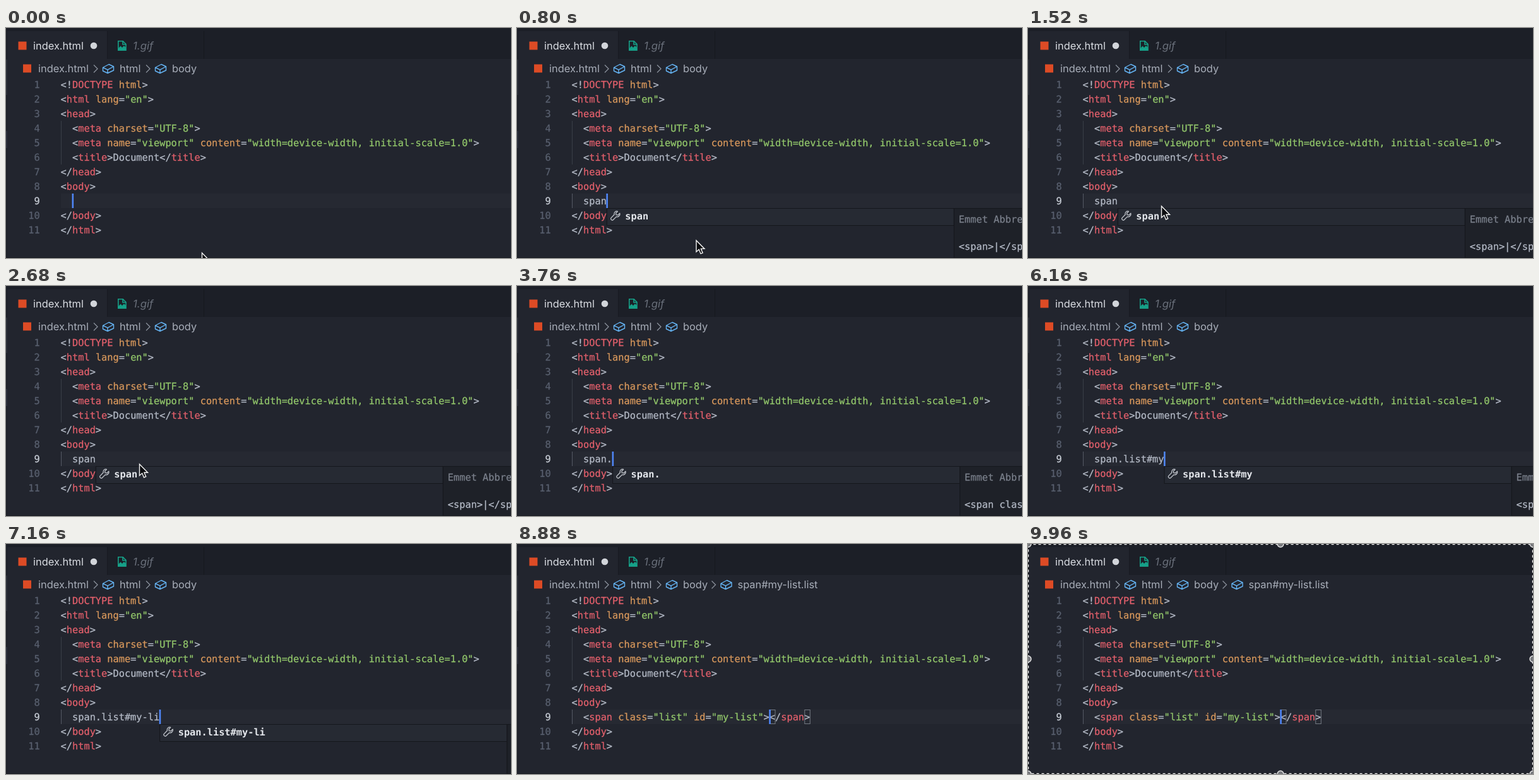
An HTML page that plays this animation: 800 px wide and 364 px high, repeating every 10000 ms.

```html
<!DOCTYPE html>
<html lang="en">
<head>
<meta charset="utf-8">
<title>Editor abbreviation</title>
<style>
html, body { margin: 0; width: 100%; height: 100%; overflow: hidden; background: #22252e; }
svg { display: block; width: 100vw; height: 100vh; }
text { white-space: pre; text-rendering: geometricPrecision; fill: currentColor; }
.code { font: 15.3px "DejaVu Sans Mono", monospace; color: #b4bac6; }
.code, .code tspan { fill: currentColor; stroke: currentColor; stroke-width: .25px; }
.bold { font-weight: bold; color: #e4e7ec; stroke: none; }
.ui { font: 16.4px Inter, sans-serif; color: #a8aeb9; }
.num { color: #59606f; text-anchor: end; }
</style>
</head>
<body>
<svg id="stage" viewBox="0 0 800 364"></svg>
<script>
const LOOP = 10000, X0 = 86.6, CW = 9.211, TOP = 262;
const RED = '#e4606c', ORANGE = '#d8985c', GREEN = '#93c86b', GREY = '#b4bac6';
const LINES = [
  '<!DOCTYPE html>', '<html lang="en">', '<head>', '  <meta charset="UTF-8">',
  '  <meta name="viewport" content="width=device-width, initial-scale=1.0">',
  '  <title>Document</title>', '</head>', '<body>', '', '</body>', '</html>'
];
const TYPED = 'span.list#my-list';
const KEYS = [240, 400, 560, 700, 3440, 4240, 4360, 4520, 4640, 4800,
  5440, 5680, 6320, 6720, 7040, 7240, 7440];
const EXPAND = 7840, CRUMB = 8000, FRAME = 9920;
const RESULT = '<span class="list" id="my-list"></span>';

const esc = s => s.replace(/&/g, '&amp;').replace(/</g, '&lt;');
const rect = (x, y, w, h, fill, more = '') =>
  `<rect x="${x}" y="${y}" width="${w}" height="${h}" fill="${fill}" ${more}/>`;
const text = (x, y, s, cls, style = '') => `<text x="${x}" y="${y}" class="${cls}" style="${style}">${s}</text>`;
const colX = n => X0 + n * CW;
const rowY = n => TOP + (n - 9) * 23;

function highlight(src) {
  let inTag = false, prev = '';
  return src.match(/<[!\/]?|"[^"]*"|[\w-]+|[^<"\w]+/g).map(tok => {
    let color = GREY;
    if (tok[0] === '<') inTag = true;
    else if (tok[0] === '"') color = GREEN;
    else if (/^[\w-]/.test(tok)) color = prev[0] === '<' ? RED : inTag ? ORANGE : GREY;
    else if (tok.includes('>')) inTag = false;
    prev = tok;
    return `<tspan style="color:${color}">${esc(tok)}</tspan>`;
  }).join('');
}

function codeLine(src, n) {
  const body = src.trimStart();
  return text(colX(src.length - body.length), rowY(n) + 16.5, highlight(body), 'code');
}

const chevron = x => `<path d="M${x - 3} 58.5l6 6l-6 6" fill="none" stroke="#8a909b" stroke-width="1.3"/>`;
const cube = x => `<path transform="translate(${x} 64)" d="M-8.5 -1.5L1 -6.5L8.5 -3V3L-1 7.5L-8.5 4ZM-8.5 -1.5L-1 2.2L8.5 -3M-1 2.2V7.5"
  fill="none" stroke="#65b4f4" stroke-width="1.4" stroke-linejoin="round"/>`;
const crumb = (x, label) => chevron(x) + cube(x + 20) + text(x + 38, 70, label, 'ui');

function backdrop() {
  let s = rect(0, 0, 800, 364, '#22252e') + rect(0, 0, 800, 49, '#1c1f27') +
    rect(2, 5, 158, 45, '#22252e') + rect(160, 5, 1, 44, '#181a21') + rect(313, 5, 1, 44, '#16181e') +
    rect(0, 49, 2, 315, '#1d2028') + rect(0, 50, 2, 56, '#2a2e37') + rect(0, 163, 2, 27, '#2a2e3a');
  s += rect(19.5, 21.5, 13, 13, '#dd4b25') + text(43, 33.5, 'index.html', 'ui', 'color:#dadde3') +
    '<circle cx="139" cy="28" r="5.3" fill="#d2d5da"/>';
  s += `<path d="M177.8 20.8h7.4l4.8 4.8v9.6h-12.2zM185 21v5h5" fill="none" stroke="#16a088" stroke-width="1.6"/>
    <path d="M178 35v-3l3.5-3.5l2.5 2.5l3-3l3 3v4z" fill="#16a088"/>` +
    text(201, 33.5, '1.gif', 'ui', 'font-style:italic;font-size:16.8px;color:#6a707b');
  s += rect(27, 57.5, 13, 13, '#dd4b25') + text(51, 70, 'index.html', 'ui') +
    crumb(142, 'html') + crumb(225, 'body');
  s += rect(87, TOP, 713, 23, '#262932') + rect(87, rowY(4), 1, 69, '#3a3e48');
  LINES.forEach((src, i) => {
    s += text(53.7, rowY(i + 1) + 16.5, i + 1, 'code num', i === 8 ? 'color:#c8cdd6' : '');
    if (src) s += codeLine(src, i + 1);
  });
  return s + rect(0, 363, 800, 1, '#191b21');
}

function preview(abbr) {
  const [, cls, id] = abbr.match(/^\w+(\.\w*)?(#[\w-]*)?/);
  if (abbr.length < 4) return `<${abbr}>|</${abbr}>`;
  const attr = (name, v) => v ? ` ${name}="${v.slice(1) || '|'}"` : '';
  return `<span${attr('class', cls)}${attr('id', id)}>|</span>`;
}

function popup(abbr) {
  const x = colX(2 + abbr.length) + .5, side = x + 550, edge = '#15171c';
  return rect(x, 285.5, 550, 27, '#262a33', `stroke="${edge}"`) +
    `<path transform="translate(${x + 5} 289)" d="M15.5 4.2L12.5 7L9.6 6.6L9.3 4L12 1.2C8.7 .2 5.8 3 6.8 6.3L1.6 11.6C.2 13.3 2.9 16.2 4.8 14.8L10 9.6C13.4 10.6 16.3 7.4 15.5 4.2Z"
      fill="none" stroke="#c2c6cd" stroke-width="1.3" stroke-linejoin="round"/>` +
    text(x + 29, 302.5, abbr, 'code bold') +
    rect(side, 285.5, 420, 78, '#1e2128', `stroke="${edge}"`) +
    text(side + 7.5, 307.5, 'Emmet Abbreviation', 'code', 'color:#7b818c') +
    text(side + 7.5, 351, esc(preview(abbr)), 'code');
}

function pointer(t) {
  if (t >= KEYS[4] || (t >= KEYS[0] && t < 700)) return '';
  const u = Math.min(1, Math.max(0, (t - 700) / 700)), e = 1 - (1 - u) ** 2;
  return `<path transform="translate(${310.5 - 99 * e} ${356 - 74 * e})" d="M0 0V18L4.2 14.3L7 21L10.2 19.7L7.4 13.2H13Z"
    fill="#0b0c0f" stroke="#f2f2f2" stroke-width="1.4"/>`;
}

function selectionFrame() {
  let s = rect(0.5, 0.5, 799, 363, 'none', 'stroke="#15171c" stroke-width="2"') +
    rect(0.5, 0.5, 799, 363, 'none', 'stroke="#f0f0f0" stroke-width="1.5" stroke-dasharray="4 4"');
  for (const x of [0, 400, 800]) for (const y of [0, 182, 364])
    if (x !== 400 || y !== 182)
      s += `<circle cx="${x}" cy="${y}" r="5" fill="#77797d" stroke="#e8e8e8" stroke-width="1.4"/>`;
  return s;
}

function scene(t) {
  const n = KEYS.filter(k => k <= t).length, done = t >= EXPAND;
  const last = done ? EXPAND : n ? KEYS[n - 1] : 0;
  const col = done ? 34 : 2 + n, abbr = TYPED.slice(0, n);
  let s = n ? rect(87, TOP, 1, 23, '#555a65') : '';
  if (done) {
    s += codeLine('  ' + RESULT, 9);
    for (const c of [34, 40])
      s += rect(colX(c) + .7, TOP + .5, CW - .7, 22, 'none', 'stroke="#747a83"');
  } else if (n) {
    s += text(colX(2), TOP + 16.5, abbr, 'code') + popup(abbr);
  }
  if ((t - last) % 1000 < 500) s += rect(colX(col) - .5, TOP, 2.6, 23, '#4f86f7');
  if (t >= CRUMB) s += crumb(311.5, 'span#my-list.list');
  s += pointer(t);
  return t >= FRAME ? s + selectionFrame() : s;
}

const stage = document.getElementById('stage');
stage.innerHTML = backdrop() + '<g id="live"></g>';
const live = document.getElementById('live');
let shown = '';
function draw() {
  const s = scene(performance.now() % LOOP);
  if (s !== shown) live.innerHTML = shown = s;
  requestAnimationFrame(draw);
}
draw();
</script>
</body>
</html>
```
